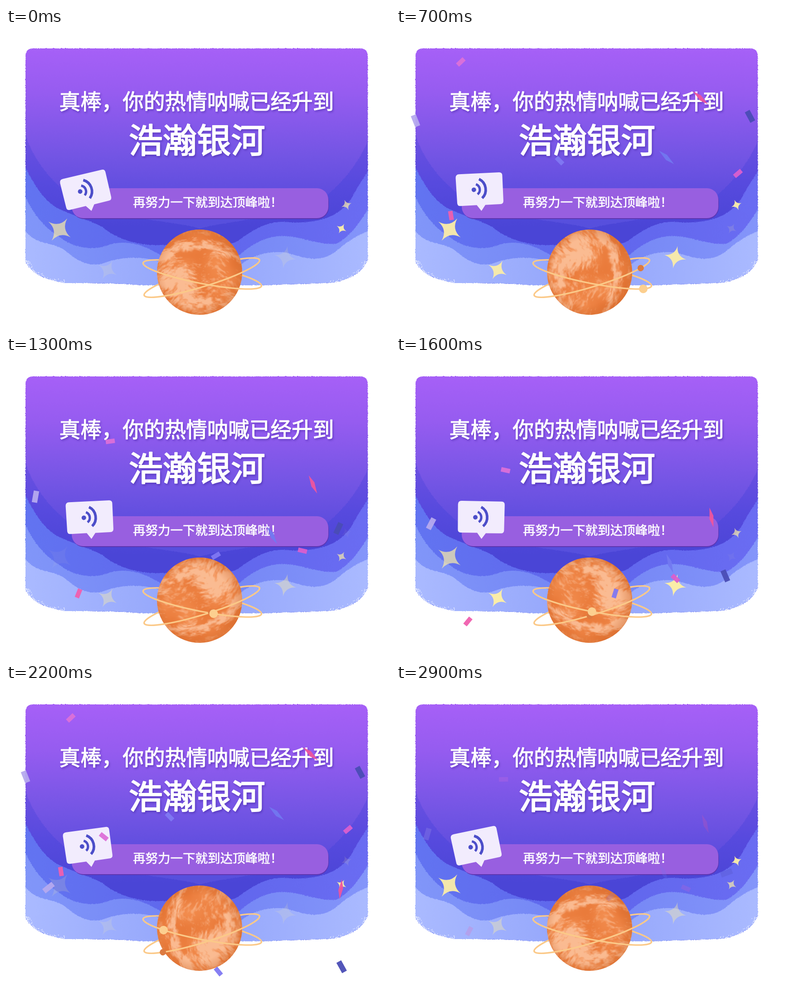
An HTML page with a canvas that plays this animation: 847x661 px, repeating every 3 s.

```html
<!DOCTYPE html>
<html lang="zh-CN">
<head>
<meta charset="utf-8">
<style>
html, body { margin: 0; width: 100%; height: 100%; overflow: hidden; background: #fff; }
svg, canvas { position: absolute; left: 0; top: 0; display: block; }
#planet { left: 333px; top: 444px; width: 188px; height: 188px; border-radius: 50%; }
text {
  font-family: "Noto Sans CJK SC", "Noto Sans CJK", sans-serif;
  fill: #fff; stroke: #fff; stroke-linejoin: round;
  filter: drop-shadow(2px 3px 2px rgba(60, 30, 150, .45));
}
#hint { filter: none; }
.orbit { fill: none; stroke: #fbc988; stroke-width: 3.4; stroke-linecap: round; }
</style>
</head>
<body>
<svg width="847" height="661" viewBox="0 0 847 661">
  <defs>
    <linearGradient id="sky" gradientUnits="userSpaceOnUse" x1="0" y1="45" x2="0" y2="440">
      <stop offset="0" stop-color="#a660f7"/>
      <stop offset=".25" stop-color="#965cf0"/>
      <stop offset=".6" stop-color="#7355e4"/>
      <stop offset=".85" stop-color="#5b4cdd"/>
      <stop offset="1" stop-color="#5650dd"/>
    </linearGradient>
    <linearGradient id="deep" gradientUnits="userSpaceOnUse" x1="0" y1="240" x2="0" y2="440">
      <stop offset="0" stop-color="#6c50e2"/>
      <stop offset=".5" stop-color="#574ade"/>
      <stop offset="1" stop-color="#4a45d6"/>
    </linearGradient>
    <linearGradient id="w1" gradientUnits="userSpaceOnUse" x1="43" y1="0" x2="798" y2="0">
      <stop offset="0" stop-color="#6274f1"/><stop offset=".5" stop-color="#5f66ec"/><stop offset="1" stop-color="#6a6cf2"/>
    </linearGradient>
    <linearGradient id="w2" gradientUnits="userSpaceOnUse" x1="43" y1="0" x2="798" y2="0">
      <stop offset="0" stop-color="#8196f9"/><stop offset=".5" stop-color="#7284f4"/><stop offset="1" stop-color="#8495fa"/>
    </linearGradient>
    <linearGradient id="w3" gradientUnits="userSpaceOnUse" x1="43" y1="0" x2="798" y2="0">
      <stop offset="0" stop-color="#aabaff"/><stop offset=".5" stop-color="#92a4fb"/><stop offset="1" stop-color="#aabaff"/>
    </linearGradient>
    <clipPath id="card">
      <path d="M43 62Q43 45 60 45H781Q798 45 798 62V508C792 532 768 552 720 561C660 564 600 565 560 567H300C250 562 200 562 130 562C95 556 58 545 43 515Z"/>
    </clipPath>
    <filter id="rough" filterUnits="userSpaceOnUse" x="20" y="25" width="800" height="560" color-interpolation-filters="sRGB">
      <feTurbulence type="fractalNoise" baseFrequency=".5" numOctaves="2" seed="4"/>
      <feDisplacementMap in="SourceGraphic" scale="3.5" xChannelSelector="R" yChannelSelector="G"/>
    </filter>
  </defs>
  <g filter="url(#rough)">
    <g clip-path="url(#card)">
      <path fill="url(#sky)" d="M40 40H802V570H40Z"/>
      <path fill="url(#deep)" d="M43 235C60 290 100 340 150 375C250 425 380 425 427 442C480 425 620 420 700 375C750 335 780 290 798 250V570H43Z"/>
      <path fill="url(#w1)" d="M43 308C65 350 85 380 110 395C150 415 190 425 215 440C245 465 290 480 340 478C400 478 470 490 510 470C545 445 570 428 610 427C690 434 740 415 765 370C778 345 790 330 798 315V570H43Z"/>
      <path fill="url(#w2)" d="M43 372C60 410 85 440 120 462C150 485 190 490 220 480C260 465 300 475 340 500L515 500C545 475 570 460 610 458C660 460 690 480 730 475C765 455 785 420 798 400V570H43Z"/>
      <path fill="url(#w3)" d="M43 448C70 480 100 470 130 490C160 515 180 525 210 520C250 505 290 500 340 515L520 520C545 500 580 490 620 495C670 512 700 515 730 490C760 465 780 455 798 448V570H43Z"/>
    </g>
  </g>
  <path id="chips" fill="#fff"/>
  <g id="stars" fill="#faeda8"></g>
  <text x="117.6" y="178.5" font-size="46.6" stroke-width="1.2">真棒，你的热情呐喊已经升到</text>
  <text x="270.5" y="275" font-size="75.3" stroke-width="2.2">浩瀚银河</text>
  <rect x="146" y="355" width="566" height="66" rx="26" fill="#5c35b0"/>
  <rect x="145" y="353" width="566" height="66" rx="25" fill="#985fe0"/>
  <text id="hint" x="280" y="394" font-size="27.5" stroke-width=".7">再努力一下就到达顶峰啦！</text>
  <g id="bubble">
    <path fill="#f2ecfd" d="M143 321L231 319Q238 319 238 326L239 382Q239 389 232 389L199 390L190 403L180 390L144 391Q137 391 137 384L135 329Q135 321 143 321Z"/>
    <g transform="translate(174.5 356) rotate(-8)" fill="none" stroke="#4c4ec9">
      <circle r="5" fill="#4c4ec9" stroke="none"/>
      <path stroke-width="5.2" d="M6.5-11.3A13 13 0 0 1 6.5 11.3"/>
      <path stroke-width="5.8" d="M15-21.3A26 26 0 0 1 15 21.3"/>
    </g>
  </g>
  <path class="orbit" transform="translate(433 543) rotate(11)" d="M-133 0A133 20 0 0 1 133 0"/>
  <path class="orbit" transform="translate(432 550) rotate(-17)" d="M-133 0A133 20 0 0 1 133 0"/>
  <g id="back"></g>
</svg>
<canvas id="planet" width="188" height="188"></canvas>
<svg width="847" height="661" viewBox="0 0 847 661">
  <defs>
    <radialGradient id="shade" cx=".47" cy=".5" r=".55">
      <stop offset=".7" stop-color="#c45a1c" stop-opacity="0"/>
      <stop offset="1" stop-color="#c45a1c" stop-opacity=".45"/>
    </radialGradient>
  </defs>
  <circle cx="427" cy="538" r="94" fill="url(#shade)"/>
  <path class="orbit" transform="translate(433 543) rotate(11)" d="M-133 0A133 20 0 0 0 133 0"/>
  <path class="orbit" transform="translate(432 550) rotate(-17)" d="M-133 0A133 20 0 0 0 133 0"/>
  <g id="front"></g>
  <g id="confetti"></g>
</svg>
<script>
const LOOP = 3, STEP = .1, TAU = Math.PI * 2;
const $ = id => document.getElementById(id);
const clamp = v => Math.max(0, Math.min(1, v));

function add(parent, tag, attrs) {
  const el = document.createElementNS('http://www.w3.org/2000/svg', tag);
  for (const k in attrs) el.setAttribute(k, attrs[k]);
  return parent.appendChild(el);
}

function rng(seed) {
  return () => (seed = (seed * 16807) % 2147483647) / 2147483647;
}

// Crumbling lower corners of the card
function crumble() {
  const rand = rng(77);
  let d = '';
  for (let i = 0; i < 320; i++) {
    const side = i % 2 ? 1 : -1, a = rand() * TAU / 4;
    const inset = 1 - rand() * rand() * .2;
    const x = 420.5 + side * (292 + 85 * inset * Math.cos(a));
    const y = 512 + 50 * inset * Math.sin(a);
    d += `M${x.toFixed(1)} ${y.toFixed(1)}h1.3v1.3h-1.3z`;
  }
  $('chips').setAttribute('d', d);
}

function paintPlanet() {
  const ctx = $('planet').getContext('2d'), size = 188;
  const img = ctx.createImageData(size, size), rand = rng(31);
  const grid = Array.from({ length: 4096 }, rand);
  const cell = (x, y) => grid[(x & 63) + (y & 63) * 64];
  const noise = (x, y) => {
    const ix = Math.floor(x), iy = Math.floor(y);
    let u = x - ix, v = y - iy;
    u *= u * (3 - 2 * u);
    v *= v * (3 - 2 * v);
    const top = cell(ix, iy) * (1 - u) + cell(ix + 1, iy) * u;
    const low = cell(ix, iy + 1) * (1 - u) + cell(ix + 1, iy + 1) * u;
    return top * (1 - v) + low * v;
  };
  const bump = (d, w) => Math.exp(-d * d / (w * w));
  const dark = [233, 122, 58], base = [243, 142, 80], light = [251, 192, 153];
  for (let j = 0; j < size; j++) for (let i = 0; i < size; i++) {
    const x = i / 94 - 1, y = j / 94 - 1;
    const broad = noise(x * 2.5 + 9, y * 5 + 9);
    const bent = y - .3 * x * x + .2 * broad;
    const fine = .65 * noise(x * 9 + 30, bent * 18 + 30) + .35 * noise(x * 24 + 40, bent * 36 + 40);
    // An upper band and two bright fields lower down
    const glow = .9 * bump(y + .65 - .35 * x * x, .14)
      + .9 * bump(x + .5, .5) * bump(y - .25, .36)
      + .85 * bump(x - .1, .6) * bump(y - .7, .22);
    const a = .9 * clamp(1.2 * (glow + 1.5 * (fine - .5) + .7 * (broad - .5) - .1));
    const p = (j * size + i) * 4;
    for (let c = 0; c < 3; c++) {
      const ground = dark[c] + (base[c] - dark[c]) * broad;
      img.data[p + c] = ground + (light[c] - ground) * a;
    }
    img.data[p + 3] = 255;
  }
  ctx.putImageData(img, 0, 0);
}

// Stars twinkle once a second; peak is the brightest moment
const stars = [
  { x: 118, y: 444, r: 30, turn: -55, peak: .8 },
  { x: 224, y: 533, r: 23, turn: -61, peak: .6 },
  { x: 616, y: 505, r: 25, turn: -78, peak: .6 },
  { x: 751, y: 390, r: 12, turn: -22, peak: .8 },
  { x: 740, y: 442, r: 12, turn: -60, peak: .1 }
].map(({ x, y, r, turn, peak }) => {
  const k = r * .1;
  const d = `M${r} 0Q${k} ${k} 0 ${r}Q${-k} ${k} ${-r} 0Q${-k} ${-k} 0 ${-r}Q${k} ${-k} ${r} 0Z`;
  return { peak, el: add($('stars'), 'path', { d, transform: `translate(${x} ${y}) rotate(${turn})` }) };
});

const moons = [
  { x: 433, y: 543, tilt: 11, r: 9.5, fill: '#fccf8f', lead: 265 },
  { x: 432, y: 550, tilt: -17, r: 7, fill: '#dc7a40', lead: 271 }
].map(({ x, y, tilt, r, fill, lead }) => ({
  lead, el: add($('front'), 'circle', { r, fill, transform: `translate(${x} ${y}) rotate(${tilt})` })
}));

// x, y and turn hold at mid-flight; drift, bend, fall and spin carry them from there
const shapes = {
  chip: 'M-5-10h10v20h-10z',
  strip: 'M-6-13h12v26h-12z',
  gem: 'M-22 0L-3-5L22 0L3 5Z'
};
const pieces = [
  { shape: 'strip', fill: '#b5a9ee', x: 65, drift: 32, bend: 0, y: 310, fall: 154, turn: 10, spin: 46 },
  { shape: 'gem', fill: '#ee559d', x: 677, drift: 34, bend: 38, y: 283, fall: 188, turn: 65, spin: 35 },
  { shape: 'strip', fill: '#4a4db5', x: 733, drift: -36, bend: 49, y: 380, fall: 270, turn: 25, spin: 340 },
  { shape: 'chip', fill: '#dc70d8', x: 230, drift: 65, bend: -90, y: 188, fall: 165, turn: 82, spin: 52 },
  { shape: 'chip', fill: '#8078f2', x: 463, drift: 87, bend: -90, y: 440, fall: 215, turn: 60, spin: -110 },
  { shape: 'chip', fill: '#f05fae', x: 160, drift: 18, bend: -56, y: 523, fall: 160, turn: 22, spin: 45, early: true },
  { shape: 'gem', fill: '#7278f0', x: 587, drift: 23, bend: 54, y: 395, fall: 160, turn: 60, spin: 27, early: true },
  { shape: 'chip', fill: '#da5fcd', x: 654, drift: -115, bend: 45, y: 429, fall: 158, turn: 103, spin: 78, early: true }
];
const flakes = [];
for (const start of [0, LOOP / 2]) pieces.forEach((p, i) => {
  const born = p.early ? .18 : .3 + i * .05;
  const dies = p.early ? 2.05 : 2.4;
  const el = add($('confetti'), 'path', { d: shapes[p.shape], fill: p.fill });
  flakes.push({ ...p, start, born, dies, el });
});

function draw(t) {
  const tilt = -4 - 8 * Math.cos(t * TAU);
  $('bubble').setAttribute('transform', `translate(-1.5 0) rotate(${tilt} 190 403)`);
  $('planet').style.transform = `rotate(${t / LOOP * 360}deg)`;

  for (const { peak, el } of stars)
    el.setAttribute('opacity', clamp(.55 + .5 * Math.cos((t - peak) * TAU)));

  // Moons hurry round the far side and linger in front
  for (const { lead, el } of moons) {
    const turn = t / LOOP * TAU;
    const a = lead / 360 * TAU + turn + .7 * Math.sin(turn);
    const x = Math.cos(a), y = Math.sin(a);
    el.setAttribute('cx', 133 * x);
    el.setAttribute('cy', 20 * y);
    const layer = $(y > 0 || x > .85 ? 'front' : 'back');
    if (el.parentNode !== layer) layer.appendChild(el);
  }

  const ending = clamp((LOOP - t) / .45);
  for (const f of flakes) {
    const age = t - f.start, mid = age - 1.3;
    const q = mid + .1 * Math.sin(mid / 1.8 * TAU);
    const x = f.x + f.drift * q + f.bend * q * q, y = f.y + f.fall * q;
    el = f.el;
    el.setAttribute('opacity', .95 * ending * clamp((age - f.born) / .1) * clamp((f.dies - age) / .2));
    el.setAttribute('transform', `translate(${x} ${y}) rotate(${f.turn + f.spin * q})`);
  }
}

let el;
crumble();
paintPlanet();
const began = performance.now();
function tick() {
  const t = (performance.now() - began) / 1000 % LOOP;
  draw(Math.floor(t / STEP) * STEP);
  requestAnimationFrame(tick);
}
tick();
</script>
</body>
</html>
```
